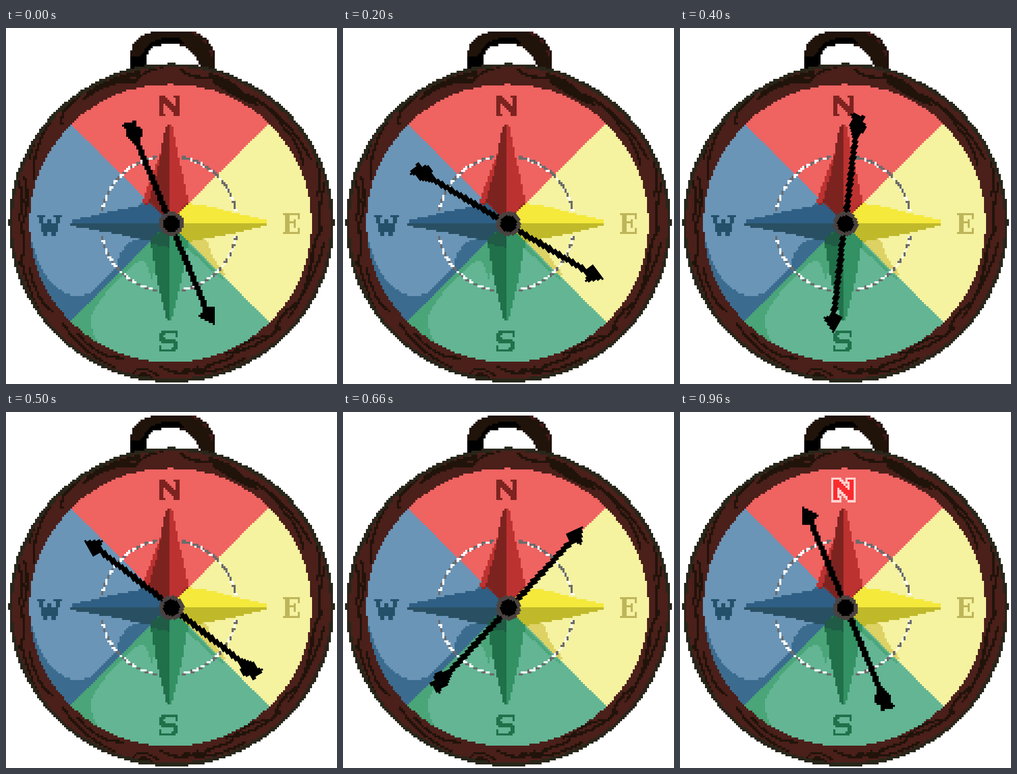
An HTML page with a canvas for the animation above (1000 ms loop, 650 px wide and 700 px high).

```html
<!DOCTYPE html>
<html lang="en">
<head>
<meta charset="utf-8">
<title>Compass</title>
<style>
  html, body { margin: 0; width: 100%; height: 100%; overflow: hidden; background: #fff; }
  #stage { position: relative; width: 650px; height: 700px; overflow: hidden; }
  canvas { position: absolute; left: 0; top: -1.34px; width: 650px; height: 702.8125px; image-rendering: pixelated; }
  #needle { transform-origin: 325px 385.9375px; }
  #glow { opacity: 0; }
</style>
</head>
<body>
<div id="stage" role="img" aria-label="Compass: N E S W">
  <canvas id="dial"></canvas>
  <canvas id="glow"></canvas>
  <canvas id="needle"></canvas>
</div>
<script>
const CELL = 4.0625, COLS = 160, ROWS = 173, TOP = -1.34;

function context(canvas) {
  canvas.width = COLS;
  canvas.height = ROWS;
  return canvas.getContext('2d', { willReadFrequently: true });
}
const [dial, glow, needle] = ['dial', 'glow', 'needle'].map(id => context(document.getElementById(id)));
const scratch = context(document.createElement('canvas'));

// Draws one path in stage pixels as hard-edged cells.
function paint(target, color, shape, { width = 0, dash = [], clip } = {}) {
  const path = new Path2D(shape);
  scratch.clearRect(0, 0, COLS, ROWS);
  scratch.save();
  scratch.setTransform(1 / CELL, 0, 0, 1 / CELL, 0, -TOP / CELL);
  if (clip) scratch.clip(clip);
  scratch.lineWidth = width;
  scratch.setLineDash(dash);
  if (width) scratch.stroke(path); else scratch.fill(path);
  scratch.restore();

  const image = scratch.getImageData(0, 0, COLS, ROWS);
  for (let i = 3; i < image.data.length; i += 4) image.data[i] = image.data[i] > 112 ? 255 : 0;
  scratch.putImageData(image, 0, 0);
  scratch.globalCompositeOperation = 'source-in';
  scratch.fillStyle = color;
  scratch.fillRect(0, 0, COLS, ROWS);
  scratch.globalCompositeOperation = 'source-over';
  target.drawImage(scratch.canvas, 0, 0);
}

function ellipse(x, y, rx, ry = rx) {
  const path = new Path2D();
  path.ellipse(x, y, rx, ry, 0, 0, 2 * Math.PI);
  return path;
}

function letter(d, col, row) {
  const path = new Path2D();
  path.addPath(new Path2D(d), new DOMMatrix([CELL, 0, 0, CELL, col * CELL, TOP + row * CELL]));
  return path;
}

const BARK = '#20130a';
const face = ellipse(323, 384, 277, 274);
const rim = ellipse(325, 383.5, 312, 307);
const north = letter('M0 0H3L8 6V1H7V0H10V10H8L2 3.5V9H3V10H0Z', 74, 33);

function drawHanger() {
  paint(dial, BARK, 'M242 82V60H246V42Q255 15 290 7H365Q400 18 408 45H412V86H242Z');
  paint(dial, '#000', 'M242 78V58H264Q280 22 310 20H340L352 32Q300 28 277 54V78Z');
  paint(dial, '#43191a', 'M366 9Q401 22 407 66', { width: 4.5, dash: [14, 11] });
  paint(dial, '#fff', 'M277 82V52Q285 33 305 33H343Q364 38 374 62L385 82Z');
}

function drawRim() {
  paint(dial, '#28261a', ellipse(325, 383.5, 319, 313.5));
  paint(dial, '#4b1f1a', rim);
  const grain = [
    'M150 140Q200 100 255 104Q275 80 310 78M340 80Q365 102 400 96Q440 100 470 138',
    'M470 130Q520 150 545 195Q575 225 585 270M500 145Q560 185 600 260M590 200Q625 270 612 330',
    'M632 290Q610 340 618 400Q600 420 605 460M625 420Q610 480 585 520M600 440Q600 510 555 570',
    'M570 540Q530 570 530 600M540 590Q480 640 430 640M510 605Q460 615 440 650Q400 660 370 680',
    'M470 650Q400 690 350 670M245 685Q265 655 300 685M255 690Q270 672 290 690M300 665Q340 690 380 668',
    'M230 650Q180 650 140 600M215 670Q150 640 110 580M95 560Q60 540 45 470M80 580Q50 540 30 460',
    'M22 470Q45 440 30 390Q50 350 35 290M25 380Q40 340 25 300M45 260Q50 220 90 180',
    'M55 300Q45 230 110 155M110 190Q100 165 150 130'
  ].join('');
  paint(dial, BARK, grain, { width: 4.8, clip: rim });
  paint(dial, BARK, 'M160 128Q215 95 265 88', { width: 10, clip: rim });
  paint(dial, BARK, 'M395 88Q440 95 465 125L500 155Q440 135 410 108Z', { clip: rim });
}

function drawFace() {
  [
    ['#ef6361', 'M321 384L-79-16H721Z'],
    ['#f5f2a0', 'M321 384L721-16V784Z'],
    ['#63b594', 'M321 384L721 784H-79Z'],
    ['#6a95b7', 'M321 384L-79 784V-16Z'],
    ['#3b6c8f', 'M46 405Q62 470 90 503Q115 527 145 527Q165 525 180 510L215 474Q222 440 240 423L285 405L321 384L100 605L30 560Z'],
    ['#4aa578', 'M321 384L110 595L200 645Q160 595 165 570Q180 535 215 500Q245 465 268 455Q278 458 287 500L300 420Z'],
    ['#ddd263', 'M345 405L390 413Q400 425 405 450L432 485L425 488Z'],
    ['#4aa578', 'M340 404L432 496L420 490L350 428Z']
  ].forEach(([color, d]) => paint(dial, color, d, { clip: face }));
}

function drawDashes() {
  const gap = 0.18;
  for (let q = 0; q < 4; q++) {
    const arc = new Path2D();
    arc.arc(320, 385, 134, q * Math.PI / 2 + gap, (q + 1) * Math.PI / 2 - gap);
    paint(dial, '#fff', arc, { width: 4.6 });
    paint(dial, '#6b6b6b', arc, { width: 4.6, dash: q === 3 ? [18, 5] : [8, 9] });
  }
}

function drawRose() {
  [
    ['#3b6c8f', 'M262 345L285 343L290 372Z'],
    ['#bc3230', 'M311 225L268 341L290 355L321 384Z'],
    ['#bc3230', 'M319 192H326L336 240L350 300L359 348L321 384Z'],
    ['#7c2320', 'M314 192H321V384L279 349L296 285Z'],
    ['#8f2a2a', 'M272 345L300 372L290 345ZM335 368L359 341V354Z'],
    ['#2f5f84', 'M128 380L200 362L285 345L321 384H128Z'],
    ['#294f63', 'M128 384H321L283 419L215 404L128 389Z'],
    ['#f5e93b', 'M321 384L359 345L400 351L450 364L513 379V384Z'],
    ['#c0b92a', 'M321 384H513V388L440 405L358 420L343 407Z'],
    ['#20704a', 'M321 384V577H316L296 495L284 415Z'],
    ['#339163', 'M321 384L358 418L346 490L325 577H320Z'],
    ['#1f5b45', 'M283 417L321 384V432L287 425Z']
  ].forEach(([color, d]) => paint(dial, color, d));
}

function drawLetters() {
  paint(dial, '#7c2320', north);
  paint(dial, '#beb55a', letter('M0 0H8V3H7V1H3V4H5V3H6V7H5V5H3V9H7V7H8V10H0V9H1V1H0Z', 134, 90));
  paint(dial, '#20704a', letter('M2 0H9V3H8V1H3L2 2V3L3 4H7L9 6V8L7 10H0V7H1V9H6L7 8V6H2L0 4V2Z', 74, 147));
  paint(dial, '#25506a', letter('M0 0H4V1H3L4 7L5 2H7L8 7L9 1H8V0H12V1H11L9 10H7L6 6L5 10H3L1 1H0Z', 15, 91));
  paint(glow, '#ffd3d0', north, { width: 2 * CELL });
  paint(glow, '#fb2c2f', north);
}

function drawNeedle() {
  paint(needle, '#000', 'M254 215L395 558', { width: 11 });
  paint(needle, '#000', 'M412 584L376 567L388 553L398 548H412Z');
  paint(needle, '#000', 'M228 190L240 185L245 190L246 182H254L257 192L268 200V210L262 226H250L236 210L234 198Z');
  paint(needle, '#4a4240', ellipse(325, 384.6, 24.6));
  paint(needle, '#000', ellipse(325, 384.6, 16.8));
}

[drawHanger, drawRim, drawFace, drawDashes, drawRose, drawLetters, drawNeedle].forEach(draw => draw());

// Two and a half turns, eased in and out, shown in 21 held poses.
const LOOP = { duration: 1000, iterations: Infinity }, STEPS = 21, TURN = -900;
const ease = t => t < 0.5 ? 2 * t * t : 1 - 2 * (1 - t) ** 2;
const hold = (ms, style) => ({ ...style, offset: ms / 1000, easing: 'steps(1, end)' });

const poses = Array.from({ length: STEPS + 1 }, (_, k) => hold(
  k ? Math.floor((100 + 100 * k / 3) / 10) * 10 : 0,
  { transform: `rotate(${TURN * ease(k / STEPS)}deg)` }
));
poses.push(hold(1000, { transform: `rotate(${TURN}deg)` }));

const spin = needle.canvas.animate(poses, LOOP);
const flash = glow.canvas.animate([
  hold(0, { opacity: 0 }), hold(960, { opacity: 1 }), hold(1000, { opacity: 1 })
], LOOP);
spin.startTime = flash.startTime = document.timeline.currentTime;
</script>
</body>
</html>
```
